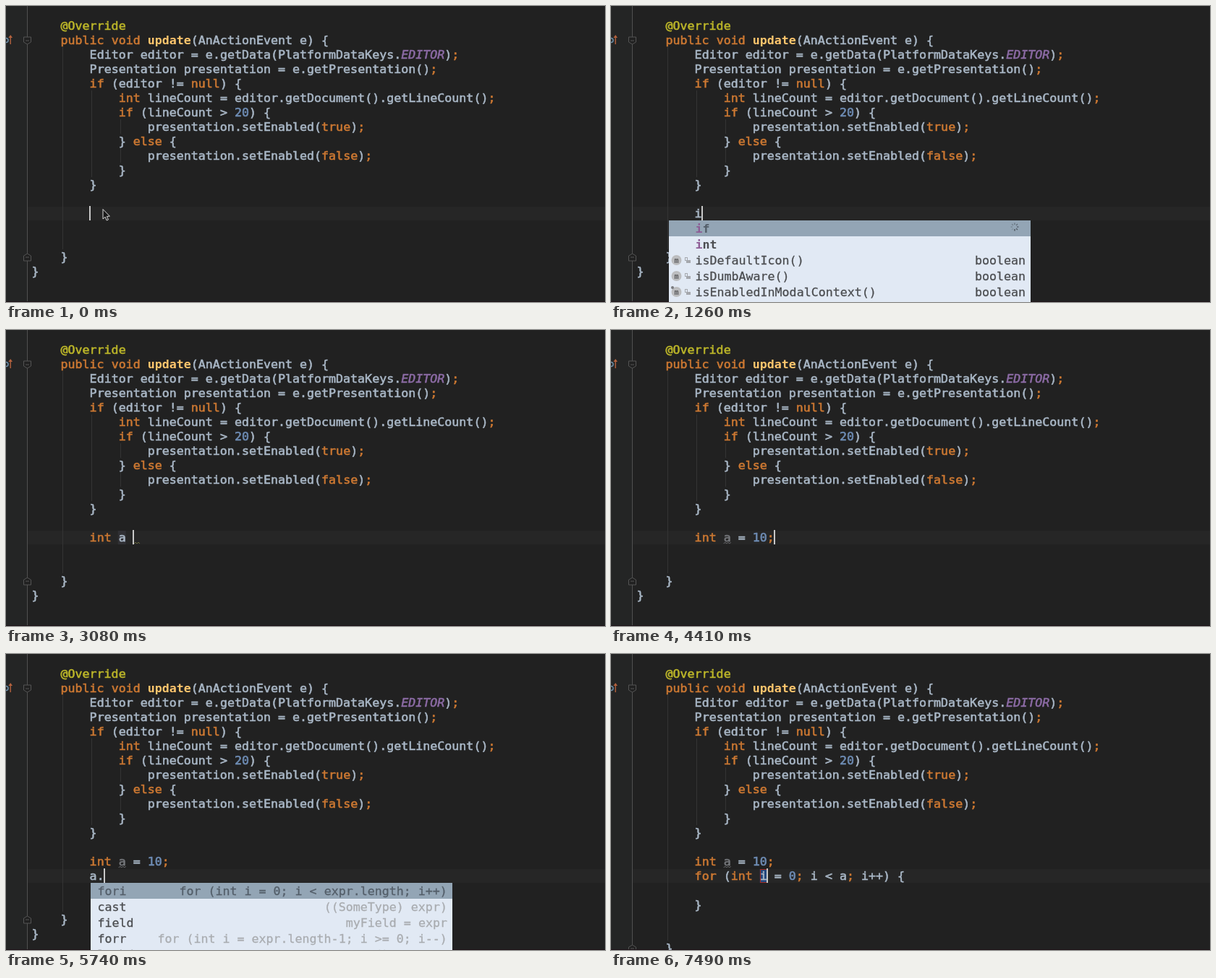
An HTML page with a canvas for the animation above (7560 ms loop, 828 by 410 pixels).

```html
<!DOCTYPE html>
<html lang="en">
<head>
<meta charset="utf-8">
<title>Code completion</title>
<style>
html, body { margin: 0; width: 100%; height: 100%; overflow: hidden; background: #212121; }
canvas { display: block; width: 828px; height: 410px; }
</style>
</head>
<body>
<canvas id="stage" width="828" height="410"></canvas>
<script>
const W = 828, H = 410, LOOP = 7560;
const canvas = document.getElementById('stage');
const dpr = window.devicePixelRatio || 1;
canvas.width = W * dpr;
canvas.height = H * dpr;
const ctx = canvas.getContext('2d');

const X0 = 35.5, CELL = 10.015, LINE = 20, SIZE = 16.635;
const FAMILY = '"DejaVu Sans Mono", monospace';
const C = {
  text: '#a9b7c6', key: '#cc7832', note: '#bbb529', fn: '#ffc66d',
  num: '#6e8cb4', konst: '#8c6ba5', dim: '#74767a',
  list: '#e1e9f4', pick: '#93a5b5', item: '#4b4d50', faint: '#a9acb0', hit: '#8d5c95'
};

const HEAD = [
  '    @Override',
  '    public void update(AnActionEvent e) {',
  '        Editor editor = e.getData(PlatformDataKeys.EDITOR);',
  '        Presentation presentation = e.getPresentation();',
  '        if (editor != null) {',
  '            int lineCount = editor.getDocument().getLineCount();',
  '            if (lineCount > 20) {',
  '                presentation.setEnabled(true);',
  '            } else {',
  '                presentation.setEnabled(false);',
  '            }',
  '        }',
  ''
];
const TAIL = ['', '', '    }', '}'];
const PAD = ' '.repeat(8);

// [time, text of the typed lines]
const STEPS = [
  [0, ''], [560, 'i'], [2660, 'in'], [2730, 'int'], [2800, 'int '], [2870, 'int a'],
  [2940, 'int a '], [3290, 'int a ='], [3430, 'int a = '], [3710, 'int a = 1'],
  [3850, 'int a = 10'], [4130, 'int a = 10;'], [4760, 'int a = 10;\n'],
  [5040, 'int a = 10;\na'], [5530, 'int a = 10;\na.'],
  [6090, 'int a = 10;\nfor (int i = 0; i < a; i++) {\n\n}']
];
const EXPAND = 6090;

// item: hit = matched prefix, bold/rest = remainder, tail = faint italic, type = right side
const WORDS = [
  { hit: 'i', bold: 'f', busy: true },
  { hit: 'i', bold: 'nt' },
  { rest: 'isDefaultIcon()', type: 'boolean', icon: 'm' },
  { rest: 'isDumbAware()', type: 'boolean', icon: 'm' },
  { rest: 'isEnabledInModalContext()', type: 'boolean', icon: 'm', dot: true },
  { rest: 'isInInjectedContext()', type: 'boolean', icon: 'm' }
];
const NAMES = [
  { hit: 'a', type: 'int', icon: 'v' },
  { hit: 'a', bold: 'ctionPerformed', rest: '(AnActionEvent e)', type: 'void', icon: 'm' },
  { hit: 'a', bold: 'ssert' },
  { hit: 'A', rest: 'CTIONS_KEY', tail: ' ( = Key.cre…', type: 'Key<List<AnAction>>', icon: 'f' },
  { hit: 'A', rest: 'ctions', tail: ' (com.intellij.openapi)', icon: 'f' }
];
const POSTFIX = [
  { rest: 'fori', type: 'for (int i = 0; i < expr.length; i++)' },
  { rest: 'cast', type: '((SomeType) expr)' },
  { rest: 'field', type: 'myField = expr' },
  { rest: 'forr', type: 'for (int i = expr.length-1; i >= 0; i--)' },
  { rest: 'lambda', type: '() -> expr' }
];
const POPUPS = [
  { from: 700, to: 2030, x: 80, y: 297, indent: 37, items: WORDS },
  { from: 2520, to: 2660, x: 80, y: 297, indent: 37, items: WORDS },
  { from: 5180, to: 5530, x: 80, y: 317, indent: 37, items: NAMES },
  { from: 5600, to: EXPAND, x: 117, y: 317, indent: 10, items: POSTFIX, faint: true }
];

const colX = n => X0 + n * CELL;
const rowY = n => 27 + n * LINE;

function rect(x, y, w, h, color) {
  ctx.fillStyle = color;
  ctx.fillRect(x, y, w, h);
}

function disc(x, y, r, color) {
  ctx.fillStyle = color;
  ctx.beginPath();
  ctx.arc(x, y, r, 0, Math.PI * 2);
  ctx.fill();
}

function path(points, fill, stroke, width = 1) {
  ctx.beginPath();
  points.forEach(([x, y]) => ctx.lineTo(x, y));
  ctx.closePath();
  if (fill) { ctx.fillStyle = fill; ctx.fill(); }
  if (stroke) { ctx.strokeStyle = stroke; ctx.lineWidth = width; ctx.stroke(); }
}

// Writes a run, slightly thickened, and returns the x after it.
function write(str, x, mid, color, style = '', weight = 0.3) {
  ctx.font = `${style} ${SIZE}px ${FAMILY}`;
  ctx.fillStyle = ctx.strokeStyle = color;
  ctx.lineWidth = weight;
  ctx.fillText(str, x, mid + 5.5);
  if (!style.includes('bold')) ctx.strokeText(str, x, mid + 5.5);
  return x + str.length * CELL;
}

const TOKEN = /@\w+|\w+|[;]|[^\w\s;@]+/g;
const KEYWORD = /^(public|void|if|else|int|null|true|false|for|;)$/;

function codeLine(str, row, dimVar) {
  for (const m of str.matchAll(TOKEN)) {
    const word = m[0];
    let color = C.text, style = '';
    if (KEYWORD.test(word)) color = C.key;
    else if (/^\d/.test(word)) color = C.num;
    else if (word[0] === '@') color = C.note;
    else if (word === 'update') { color = C.fn; style = 'bold'; }
    else if (word === 'EDITOR') { color = C.konst; style = 'italic'; }
    else if (dimVar && word === 'a') color = C.dim;
    write(word, colX(m.index), rowY(row), color, style, 0.6);
  }
}

function wave(x, y, w, color) {
  ctx.strokeStyle = color;
  ctx.lineWidth = 1;
  ctx.beginPath();
  for (let i = 0; i <= w; i += 2) ctx.lineTo(x + i, y + (i % 4 ? -1 : 1));
  ctx.stroke();
}

function foldMark(y, dir) {
  const x = 29.5, s = 5 * dir;
  path([[x - 5, y - s], [x + 5, y - s], [x + 5, y + s * 0.4], [x, y + s], [x - 5, y + s * 0.4]],
    '#212121', '#555');
  rect(x - 2.5, y - 0.5, 5, 1, '#555');
}

function guide(x, top, bottom) {
  rect(x, top, 1, bottom - top, '#343434');
}

function gutter(endRow) {
  rect(0, 0, 29, H, '#242525');
  rect(29, 0, 1, H, '#505050');
  ctx.strokeStyle = '#6b8ca6';
  ctx.lineWidth = 1.6;
  ctx.beginPath();
  ctx.arc(0, 47.5, 3, 0, Math.PI * 2);
  ctx.stroke();
  rect(5.5, 42, 1.4, 11, '#b5623e');
  path([[3.4, 44], [6.2, 40], [9, 44]], '#b5623e');
  foldMark(rowY(1) + 1, 1);
  foldMark(rowY(endRow) + 1, -1);
}

function pointer(x, y) {
  const shape = [[0, 0], [0, 13.5], [3.1, 10.7], [5.2, 15.5], [7.4, 14.5], [5.4, 9.9], [9.4, 9.7]];
  path(shape.map(([a, b]) => [x + a, y + b]), '#1a1a1a', '#d8d8d8');
}

function spinner(x, y, t) {
  const lead = Math.floor(t / 70) % 8;
  for (let i = 0; i < 8; i++) {
    const a = i * Math.PI / 4, age = (lead - i + 8) % 8;
    ctx.globalAlpha = 0.9 - age * 0.1;
    ctx.strokeStyle = '#3e454c';
    ctx.lineWidth = 1.4;
    ctx.beginPath();
    ctx.moveTo(x + Math.cos(a) * 3, y + Math.sin(a) * 3);
    ctx.lineTo(x + Math.cos(a) * 5.5, y + Math.sin(a) * 5.5);
    ctx.stroke();
  }
  ctx.globalAlpha = 1;
}

function itemIcon(item, x, y) {
  if (item.icon === 'v') {
    rect(x + 6, y - 5, 10, 7, '#8299b4');
    rect(x + 4, y + 1, 13, 6, '#7797bf');
    rect(x + 5, y + 3, 3, 3, '#b3a878');
    return;
  }
  disc(x + 10.5, y, 7, item.icon === 'm' ? '#bcbdbf' : '#c3bfb0');
  ctx.font = `bold 10px ${FAMILY}`;
  ctx.fillStyle = '#5b5c5e';
  ctx.fillText(item.icon, x + 7.5, y + 3.5);
  if (item.icon === 'f') rect(x + 3, y - 6, 5, 3, '#aaa47e');
  if (item.dot) disc(x + 5, y - 6, 2, '#77797c');
  rect(x + 24, y, 6, 4, '#a5a8ad');
  ctx.strokeStyle = '#a5a8ad';
  ctx.lineWidth = 1;
  ctx.strokeRect(x + 22.5, y - 3.5, 3, 4);
}

function popup(p, t) {
  const { x, y, items } = p;
  rect(x, y, 500, H - y, C.list);
  rect(x, y, 500, 22, C.pick);
  items.forEach((item, i) => {
    const mid = y + 11 + i * 22;
    const ink = i ? C.item : '#535e69';
    if (item.icon) itemIcon(item, x, mid);
    let at = x + p.indent - 0.5;
    if (item.hit) at = write(item.hit, at, mid, C.hit, item.bold ? 'bold' : '');
    if (item.bold) at = write(item.bold, at, mid, ink, 'bold');
    if (item.rest) at = write(item.rest, at, mid, ink);
    if (item.tail) write(item.tail, at, mid, C.faint, 'italic');
    if (item.type) {
      const end = x + 493;
      write(item.type, end - item.type.length * CELL, mid, p.faint && i ? C.faint : ink);
    }
    if (item.busy) spinner(x + 478, mid - 2, t);
  });
}

function draw(t) {
  const text = STEPS.filter(s => s[0] <= t).pop()[1];
  const typed = text.split('\n');
  const expanded = t >= EXPAND;
  const lines = HEAD.concat(typed.map(s => s && PAD + s), TAIL);
  const caretRow = expanded ? 14 : 12 + typed.length;
  const caretCol = expanded ? 18 : 8 + typed[typed.length - 1].length;
  const endRow = lines.length - 2;
  const dimVar = t >= 4200;

  ctx.setTransform(dpr, 0, 0, dpr, 0, 0);
  rect(0, 0, W, H, '#212121');
  rect(30, rowY(caretRow) - 9, W - 30, 19, '#262626');
  guide(78, 57, rowY(endRow) - 10);
  guide(118, 117, 237);
  guide(158, 157, 177);
  guide(158, 197, 217);
  gutter(endRow);
  rect(0, 409, W, 1, '#1e1318');

  if (t >= 2940 && t < 3290) {
    rect(colX(12) - 1, rowY(13) - 9, 11, 19, '#303034');
    wave(177, 295, 8, '#67673c');
  }
  if (expanded) rect(colX(17), rowY(14) - 9, 10, 19, '#23467c');
  lines.forEach((s, i) => codeLine(s, i, dimVar && i === 13));
  if (dimVar) wave(colX(12), 295, 10, '#6c6d70');
  if (expanded) {
    ctx.strokeStyle = '#a02c24';
    ctx.lineWidth = 1;
    ctx.strokeRect(206.5, 298.5, 10, 18);
  }
  rect(Math.round(colX(caretCol)) - 1, rowY(caretRow) - 10, 2, 20, '#c8c8c8');
  if (t < 560) pointer(134, 281.5);
  POPUPS.filter(p => t >= p.from && t < p.to).forEach(p => popup(p, t));
}

const start = performance.now();
function tick() {
  draw((performance.now() - start) % LOOP);
  requestAnimationFrame(tick);
}
tick();
</script>
</body>
</html>
```
